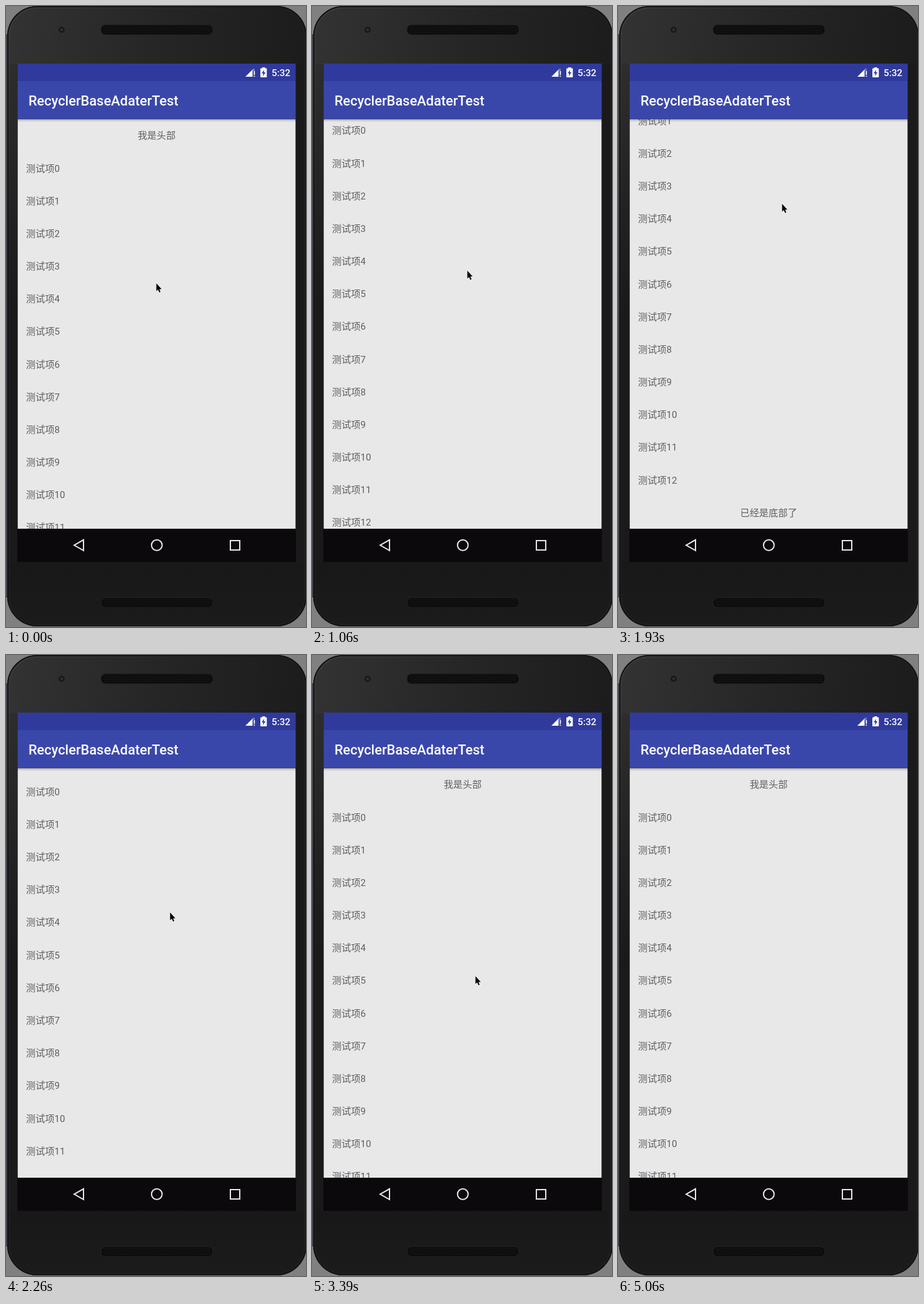
An HTML page with a canvas that plays this animation: 480x992 px, repeating every 5.19 s.

```html
<!DOCTYPE html>
<html lang="zh-CN">
<head>
<meta charset="utf-8">
<title>RecyclerBaseAdaterTest</title>
<style>
html, body { margin: 0; width: 100%; height: 100%; overflow: hidden; background: #808080; }
canvas { display: block; width: 480px; height: 992px; }
</style>
</head>
<body>
<canvas id="stage" width="480" height="992"></canvas>
<script>
const ctx = document.getElementById('stage').getContext('2d');
const LOOP = 5190, STEP = 200 / 3;
const SCREEN = { x: 18.5, w: 445, top: 180.5, bottom: 835 };
const MID = 241, ROW = 52.17, MAX_SCROLL = 128;
const BODY_FONT = '15.2px Roboto, "Noto Sans CJK SC", "Noto Sans CJK", sans-serif';

// [time, x, y] of the pointer tip
const POINTER = [
  [0, 240, 442], [330, 243, 470], [600, 245, 486], [800, 246, 474],
  [1066, 248, 422], [1333, 254, 354], [1533, 260, 322], [1733, 262, 315],
  [2000, 262, 315], [2266, 262, 410], [2533, 261, 506], [2733, 261, 512],
  [3930, 261, 512], [4266, 500, 250]
];

const clamp = (v, lo, hi) => Math.min(hi, Math.max(lo, v));
const ramp = (t, a, b) => clamp((t - a) / (b - a), 0, 1);

function pointerAt(t) {
  const i = POINTER.findIndex(p => p[0] > t);
  if (i < 0) return { x: 500, y: 250 };
  const [a, b] = [POINTER[i - 1], POINTER[i]];
  const k = ramp(t, a[0], b[0]);
  return { x: a[1] + (b[1] - a[1]) * k, y: a[2] + (b[2] - a[2]) * k };
}

function scrollAt(t, y) {
  if (t < 600) return 0;
  if (t < 1333) return clamp(482 - y, 0, MAX_SCROLL);
  if (t < 2000) return MAX_SCROLL;
  return t < 2733 ? clamp(MAX_SCROLL - (y - 323), 0, MAX_SCROLL) : 0;
}

const recede = (t, start, end) => (1 - ramp(t, start, end)) ** 2;

function rect(x, y, w, h, fill) {
  ctx.fillStyle = fill;
  ctx.fillRect(x, y, w, h);
}

function round(x, y, w, h, r) {
  ctx.beginPath();
  ctx.roundRect(x, y, w, h, r);
}

function poly(points) {
  ctx.beginPath();
  points.forEach(([x, y]) => ctx.lineTo(x, y));
  ctx.closePath();
}

function gradient(x0, y0, x1, y1, ...colors) {
  const g = ctx.createLinearGradient(x0, y0, x1, y1);
  colors.forEach((c, i) => g.addColorStop(i / (colors.length - 1), c));
  return g;
}

function text(s, x, y, font, fill, align = 'left') {
  ctx.font = font;
  ctx.fillStyle = fill;
  ctx.textAlign = align;
  ctx.fillText(s, x, y);
}

function speaker(y) {
  round(152, y, 179, 16, 7);
  ctx.fillStyle = '#0c0c0c';
  ctx.fill();
  ctx.strokeStyle = '#242424';
  ctx.lineWidth = 1;
  ctx.stroke();
  for (let row = 0; row < 4; row++)
    for (let x = 156 + row % 2 * 2; x < 328; x += 4)
      rect(x, y + 2.5 + row * 3, 1.5, 1.5, '#1f1f1f');
}

function drawPhone() {
  rect(0, 0, 480, 992, '#808080');
  rect(0, 45, 3, 900, '#40444b');
  round(2, 0, 479, 991, 48);
  ctx.fillStyle = '#1a1a1a';
  ctx.fill();
  ctx.save();
  ctx.clip();
  rect(0, 0, 480, 93, gradient(0, 0, 480, 60, '#333', '#262626', '#1c1c1c'));
  rect(0, 93, 18, 400, gradient(0, 93, 0, 493, '#2d2d2d', '#191919'));
  rect(0, 888, 480, 104, gradient(0, 888, 0, 992, '#181818', '#1b1b1b'));
  ctx.restore();
  ctx.lineWidth = 2;
  ctx.strokeStyle = '#131313';
  round(3, 1, 477, 989, 47);
  ctx.stroke();
  ctx.lineWidth = 1.5;
  ctx.strokeStyle = gradient(0, 0, 200, 200, '#404040', '#202020');
  round(5, 3, 473, 985, 45);
  ctx.stroke();

  ctx.beginPath();
  ctx.arc(89, 38, 5, 0, 7);
  ctx.fillStyle = '#181a1d';
  ctx.fill();
  ctx.beginPath();
  ctx.arc(89, 38, 2, 0, 7);
  ctx.fillStyle = '#30343a';
  ctx.fill();
  speaker(30);
  speaker(945);
}

function drawBars() {
  const { x, w, top, bottom } = SCREEN;
  rect(x, top, w, 5, gradient(0, top, 0, top + 5, 'rgba(0,0,0,.25)', 'rgba(0,0,0,0)'));
  rect(x, 92, w, 28, '#303a9c');
  rect(x, 120, w, top - 120, '#3a47aa');
  text('RecyclerBaseAdaterTest', 36, 158.5, '500 21.8px Roboto, sans-serif', '#fff');
  text('5:32', 425, 112, '500 15.2px Roboto, sans-serif', '#fff');

  ctx.fillStyle = '#fff';
  poly([[383, 113], [394.5, 101.5], [394.5, 113]]);
  ctx.fill();
  rect(394.5, 100, 3.5, 4, 'rgba(255,255,255,.3)');
  rect(396.5, 104, 1.7, 6, '#fff');
  rect(396.5, 111.3, 1.7, 1.7, '#fff');
  rect(410, 98, 4.5, 3, '#fff');
  round(407, 99.5, 10.3, 14.5, 1);
  ctx.fill();
  ctx.fillStyle = '#303a9c';
  poly([[413, 102], [409, 107.5], [411.5, 107.5], [411, 112], [415.3, 106], [412.7, 106]]);
  ctx.fill();

  rect(18, bottom, 446, 53, '#0b090c');
  ctx.strokeStyle = '#e6e6ea';
  ctx.lineWidth = 2;
  ctx.lineJoin = 'miter';
  poly([[109, 861.3], [124, 852.8], [124, 869.8]]);
  ctx.stroke();
  ctx.beginPath();
  ctx.arc(MID + 0.3, 861.3, 8.5, 0, 7);
  ctx.stroke();
  ctx.strokeRect(359, 854, 15, 15);
}

// Overscroll glow: a flattened circle peeking in from an edge
function glow(edge, dir, scale, alpha) {
  if (scale <= 0 || alpha <= 0) return;
  const r = SCREEN.w * 1.5;
  ctx.beginPath();
  ctx.ellipse(MID, edge + dir * scale * (89 - r), r, r * scale, 0, 0, Math.PI * 2);
  ctx.fillStyle = `rgba(90,100,255,${alpha})`;
  ctx.fill();
}

function drawList(t, scroll) {
  const { x, w, top, bottom } = SCREEN;
  const grey = '#5f5f65';
  const baseline = row => 212.4 + row * ROW - scroll;
  ctx.save();
  ctx.beginPath();
  ctx.rect(x, top, w, bottom - top);
  ctx.clip();
  rect(x, top, w, bottom - top, '#e8e8e8');
  text('我是头部', MID, baseline(0), BODY_FONT, grey, 'center');
  for (let i = 0; i <= 12; i++)
    text('测试项' + i, 32, baseline(i + 1), BODY_FONT, grey);
  text('已经是底部了', MID, baseline(14), BODY_FONT, grey, 'center');

  const low = ramp(t, 1333, 1533) * recede(t, 1533, 2000);
  glow(bottom, -1, 0.5 * low, 0.05 * low);
  const high = ramp(t, 2340, 2533) * recede(t, 2733, 3333);
  glow(top, 1, 0.65 * high, 0.055 * high);
  ctx.restore();
}

function drawPointer({ x, y }) {
  ctx.save();
  ctx.translate(x + 0.5, y + 1);
  ctx.scale(0.87, 0.87);
  poly([[0, 0], [0, 14.5], [3.2, 11.6], [5.4, 16.8], [7.8, 15.8], [5.6, 10.8], [9.8, 10.6]]);
  ctx.lineWidth = 2;
  ctx.lineJoin = 'round';
  ctx.strokeStyle = '#f6f6f8';
  ctx.stroke();
  ctx.fillStyle = '#050505';
  ctx.fill();
  ctx.restore();
}

function render(now) {
  const t = Math.floor((now % LOOP + 7) / STEP) * STEP;
  const pointer = pointerAt(t);
  drawPhone();
  drawList(t, scrollAt(t, pointer.y));
  drawBars();
  if (t < 4260) drawPointer(pointer);
}

const start = performance.now();
function tick() {
  render(performance.now() - start);
  requestAnimationFrame(tick);
}
tick();
</script>
</body>
</html>
```
